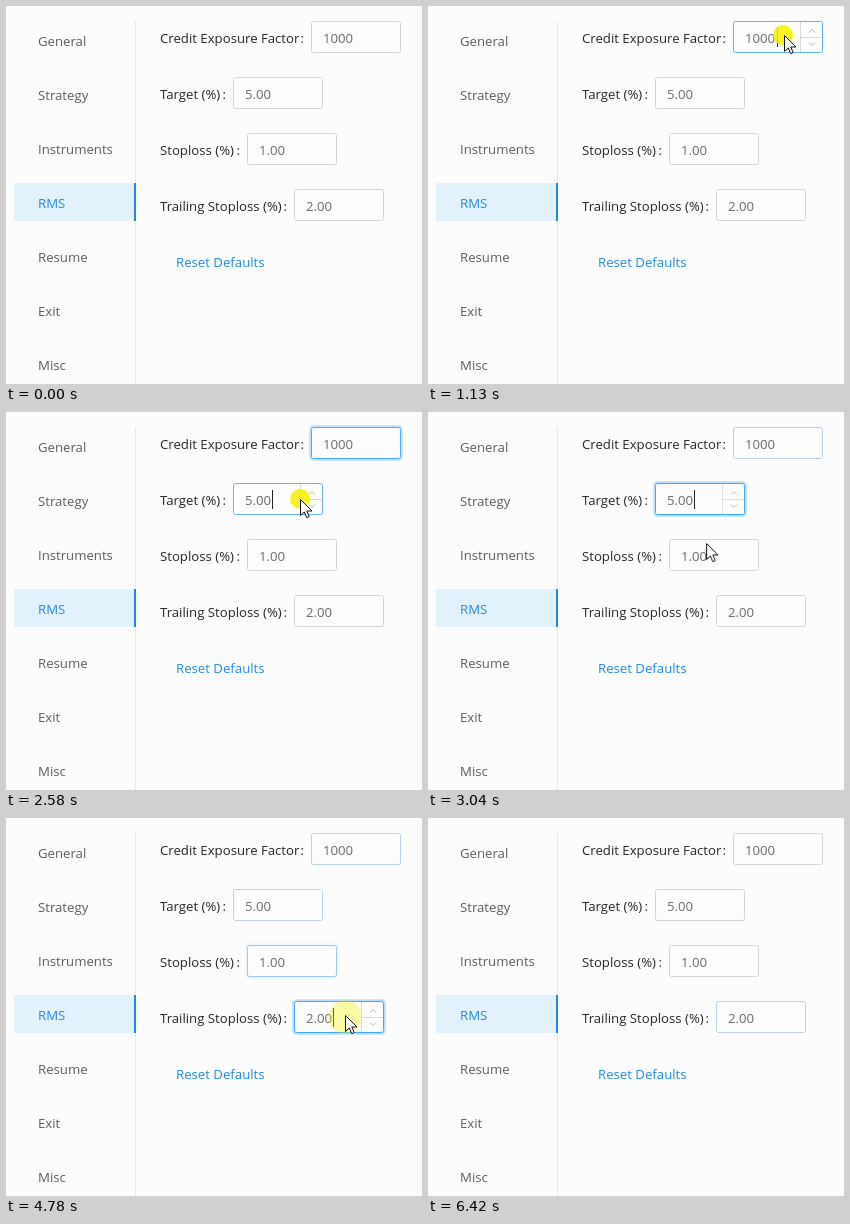
Recreate the animation shown at these times as an HTML page. Size 416 by 378 pixels, loop 7000 ms.

```html
<!DOCTYPE html>
<html lang="en">
<head>
<meta charset="utf-8">
<title>Risk settings</title>
<style>
  html, body { margin: 0; width: 100%; height: 100%; overflow: hidden; background: #fcfcfd; }
  svg { display: block; width: 416px; height: 378px; font: 13.2px "Open Sans", "Noto Sans", sans-serif; }
  .nav { fill: #5c5c5e; }
  .label { fill: #262628; }
  .value { fill: #6b6b6d; }
  .link { fill: #1f8ae6; }
  .box { fill: #fdfdfe; stroke: #d5d5d8; }
  .glow { fill: none; stroke: #1890ff; stroke-opacity: .28; stroke-width: 2.5; }
  .spin { fill: none; stroke: #d9d9dc; opacity: 0; }
  .chevron { stroke: #b2b2b6; }
  .caret { fill: #222; }
  .glow, .caret, .ripple, .pointer { opacity: 0; }
  .ripple { fill: #f8f000; }
</style>
</head>
<body>
<svg id="stage" viewBox="0 0 416 378"></svg>
<script>
const LOOP = 7000;
const GREY = '#d5d5d8', HOVER = '#69b5f0', FOCUS = '#40a9ff', TINT = '#b9cfea';
const stage = document.getElementById('stage');

function add(tag, attrs, parent = stage, text = '') {
  const el = document.createElementNS('http://www.w3.org/2000/svg', tag);
  for (const key in attrs) el.setAttribute(key, attrs[key]);
  el.textContent = text;
  return parent.appendChild(el);
}

const write = (x, y, cls, text) => add('text', { x, y, class: cls }, stage, text);

// steps: [time, value, easing to the next step]
function play(el, prop, steps) {
  const all = [[0, steps[0][1]], ...steps, [LOOP, steps[steps.length - 1][1]]];
  el.animate(
    all.map(([t, value, easing = 'linear']) => ({ offset: t / LOOP, [prop]: value, easing })),
    { duration: LOOP, iterations: Infinity }
  );
}

const HOLD = 'steps(1, end)';
const toggle = (el, times) =>
  play(el, 'opacity', [[0, 0, HOLD], ...times.map((t, i) => [t, (i + 1) % 2, HOLD])]);

// Side menu
add('rect', { x: 129, y: 15, width: 1, height: 363, fill: '#e9e9ed' });
add('rect', { x: 8, y: 177, width: 122, height: 38, fill: '#e1f2fc' });
add('rect', { x: 128, y: 177, width: 2, height: 38, fill: '#1f8ae6' });
['General', 'Strategy', 'Instruments', 'RMS', 'Resume', 'Exit', 'Misc'].forEach((name, i) =>
  write(32, 40 + 54 * i, name === 'RMS' ? 'link' : 'nav', name));
write(170, 261, 'link', 'Reset Defaults');

// Form fields with the times of hover, click, leave, blur and final border reset
const fields = [
  { label: 'Credit Exposure Factor', value: '1000', x: 305, caret: 349, enter: 830, click: 1090, leave: 1620, blur: 2560, reset: 5500 },
  { label: 'Target (%)', value: '5.00', x: 227, caret: 266, enter: 2120, click: 2560, leave: 2900, blur: 3400, reset: 5500 },
  { label: 'Stoploss (%)', value: '1.00', x: 241, caret: 280, enter: 3040, click: 3400, leave: 4180, blur: 4590, reset: 5500 },
  { label: 'Trailing Stoploss (%)', value: '2.00', x: 288, caret: 327, enter: 4370, click: 4590, leave: 4990, blur: 5330, reset: 6990 }
];

fields.forEach((f, i) => {
  const y = 15 + 56 * i, { x, enter, click, leave, blur, reset } = f;
  write(154, y + 22, 'label', f.label);
  write(x - 10.5, y + 22, 'label', ':');

  const glow = add('rect', { x: x - .5, y: y - .5, width: 91, height: 33, rx: 3, class: 'glow' });
  const box = add('rect', { x: x + .5, y: y + .5, width: 89, height: 31, rx: 2, class: 'box' });
  write(x + 12, y + 22, 'value', f.value);
  const caret = add('rect', { x: f.caret, y: y + 7, width: 1, height: 19, class: 'caret' });
  const spin = add('g', { class: 'spin' });
  add('path', { d: `M${x + 67.5} ${y + 1}v30M${x + 68} ${y + 16.5}h21` }, spin);
  add('path', { d: `M${x + 76} ${y + 11.5}l3-3 3 3m-6 10l3 3 3-3`, class: 'chevron' }, spin);

  play(glow, 'opacity', [[click + 30, 0], [click + 180, 1], [blur, 1], [blur + 250, 0]]);
  play(box, 'stroke', [
    [enter, GREY], [enter + 200, HOVER], [click, HOVER], [click + 180, FOCUS],
    [blur, FOCUS], [blur + 250, TINT], [reset, TINT, HOLD], [reset + 1, GREY]
  ]);
  play(spin, 'opacity', [[enter, 0], [enter + 240, 1], [leave + 100, 1], [leave + 340, 0]]);

  const blinks = [];
  for (let t = click; t < blur; t += 530) blinks.push(t);
  if (blinks.length % 2) blinks.push(blur);
  toggle(caret, blinks);
});

// Click highlights
const clicks = [[1090, 355, 29], [2560, 294, 87], [3400, 307, 143], [4590, 339, 199], [5330, 328, 271]];
for (const [t, cx, cy] of clicks) {
  const spot = add('g', { transform: `translate(${cx} ${cy})` });
  const ripple = add('circle', { r: 10, class: 'ripple' }, spot);
  play(ripple, 'transform', [[t + 40, 'scale(1)'], [t + 430, 'scale(2.7)']]);
  play(ripple, 'opacity', [[t - 1, 0, HOLD], [t, .88], [t + 60, .85], [t + 190, .36], [t + 430, 0]]);
}

// Mouse pointer
const mouse = add('g', {});
const arrow = add('path', {
  d: 'M.5 .5V16.5L4.3 13 6.8 18.7 9.2 17.6 6.8 12H12Z',
  fill: '#fff', stroke: '#111', class: 'pointer'
}, mouse);
const beam = add('path', {
  d: 'M-3 -7.5h2.5l1 1 1-1H4M.5 -6.5V6.5M-3 7.5h2.5l1-1 1 1H4',
  fill: 'none', stroke: '#111', class: 'pointer'
}, mouse);

const path = [
  [240, 332, 380, 'ease-in-out'], [910, 356, 29], [1420, 356, 29, 'ease-in'], [1640, 346, 48],
  [2040, 304, 67], [2360, 296, 85, 'ease-out'], [2500, 294, 87], [2720, 294, 87, 'ease-in'],
  [3040, 278, 131], [3300, 307, 143], [3780, 307, 143], [3910, 307, 155], [4150, 312, 160],
  [4460, 339, 197], [4790, 339, 197, 'ease-in'], [5200, 338, 243], [5320, 328, 271],
  [5800, 328, 273], [6110, 328, 273, 'ease-in'], [6410, 280, 380]
];
play(mouse, 'transform', path.map(([t, x, y, ease]) => [t, `translate(${x}px, ${y}px)`, ease]));

const beamTimes = fields.flatMap(f => [f.click + 300, f.leave]);
toggle(beam, beamTimes);
toggle(arrow, [240, ...beamTimes, 6410]);
</script>
</body>
</html>
```
